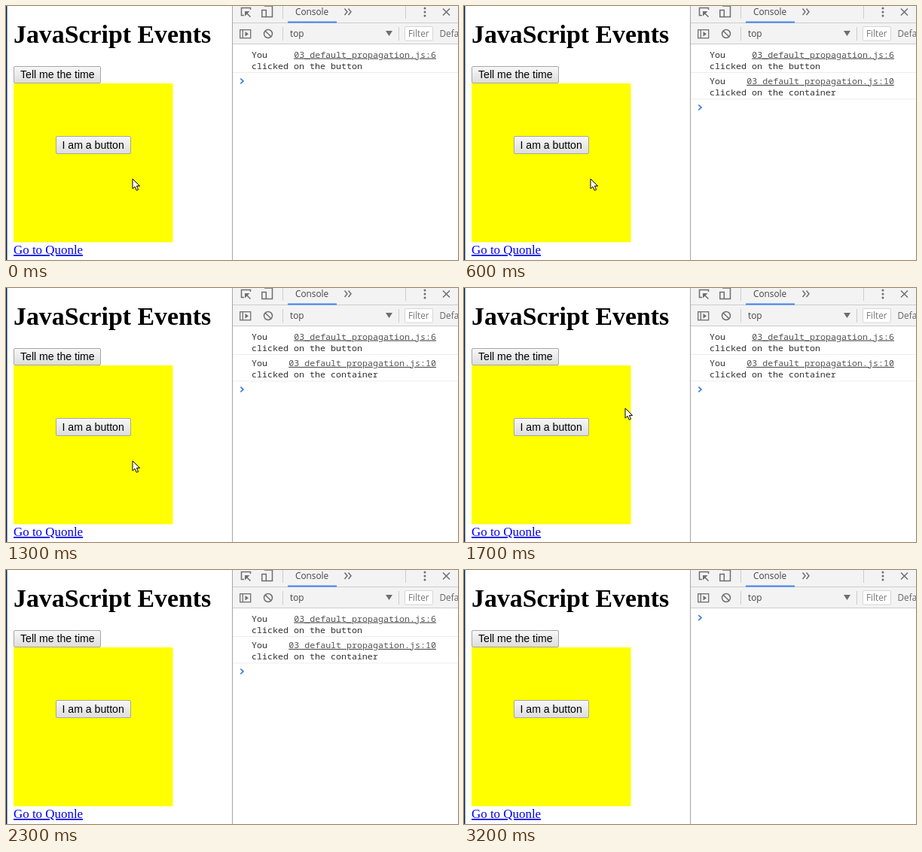
Recreate the animation shown at these times as an HTML page. Size 600 by 338 pixels, loop 3300 ms.

```html
<!DOCTYPE html>
<html lang="en">
<head>
<meta charset="utf-8">
<title>JavaScript Events</title>
<style>
  html, body { margin: 0; width: 100%; height: 100%; overflow: hidden; background: #fff; }
  svg { display: block; width: 600px; height: 338px; }
  text { white-space: pre; }
  .serif { font-family: "Liberation Serif", "Times New Roman", serif; }
  .button { font: 14.1px "Liberation Sans", Arial, sans-serif; }
  .ui { font: 11.8px "Open Sans", "Noto Sans", sans-serif; fill: #454545; }
  .log text { font: 11.67px "Noto Sans Mono", "DejaVu Sans Mono", monospace; fill: #303030; }
  .log .src { fill: #545454; text-anchor: end; text-decoration: underline; }
  .icon { fill: none; stroke: #6e6e6e; stroke-width: 1.5; }
  .solid { fill: #6e6e6e; }
  .rule { fill: none; stroke: #ccc; }
</style>
</head>
<body>
<svg viewBox="0 0 600 338">
  <defs>
    <linearGradient id="face" x2="0" y2="1">
      <stop stop-color="#f8f8f8"/><stop offset="1" stop-color="#dddddd"/>
    </linearGradient>
  </defs>
  <rect width="600" height="338" fill="#fff"/>
  <rect width="1.5" height="338" fill="#0b2c50"/>

  <!-- page -->
  <text class="serif" x="10" y="49" font-size="33.85" font-weight="bold">JavaScript Events</text>
  <rect x="10" y="103" width="211.5" height="211.3" fill="#ff0"/>
  <g fill="url(#face)" stroke="#a6a6a6">
    <rect x="10.5" y="80.5" width="115" height="22" rx="1.5"/>
    <rect x="66.5" y="173.5" width="99" height="23" rx="1.5"/>
  </g>
  <text class="button" x="19" y="96">Tell me the time</text>
  <text class="button" x="74.5" y="189.5">I am a button</text>
  <text class="serif" x="10" y="330" font-size="16.93" fill="#0000ee" text-decoration="underline">Go to Quonle</text>

  <!-- developer tools -->
  <rect x="301" width="299" height="50" fill="#f3f3f3"/>
  <path class="rule" d="M301 22.5H600M301 50.5H600M367.5 0V17M530.5 0V17M367.5 28V46M521.5 28V46"/>
  <path d="M300.5 0V338" stroke="#a5a5a5"/>
  <rect x="374" y="20.5" width="65" height="2" fill="#4285f4"/>
  <g class="icon">
    <path d="M316 12.5H312.5V2.5H324.5V5"/>
    <path d="M324.5 14.5L319 9"/>
    <path d="M343 0H353.5V14.5H346"/>
    <rect x="339.8" y="5.5" width="5.5" height="9"/>
    <path d="M449.5 3.5L453 7.8L449.5 12M454.5 3.5L458 7.8L454.5 12"/>
    <path d="M580 3.5L589 12.5M589 3.5L580 12.5"/>
    <rect x="310.7" y="31.7" width="14" height="11" stroke-width="1.3"/>
    <path d="M314.3 32V42.5" stroke-width="1.3"/>
    <circle cx="348" cy="37" r="5.5"/>
    <path d="M344.2 33.2L351.8 40.8"/>
  </g>
  <g class="solid">
    <path d="M317 7H323.5L317 13.5ZM317.5 34L322 37.2L317.5 40.4ZM504 33H513L508.5 40Z"/>
    <circle cx="556" cy="3" r="1.5"/><circle cx="556" cy="8" r="1.5"/><circle cx="556" cy="13" r="1.5"/>
  </g>
  <rect x="529.5" y="27.5" width="37" height="18.5" rx="1.5" fill="#fff" stroke="#d6d6d6"/>
  <text class="ui" x="384" y="12">Console</text>
  <text class="ui" x="377" y="41">top</text>
  <text class="ui" x="534" y="41" style="fill:#777">Filter</text>
  <text class="ui" x="575.5" y="41" style="fill:#666">Default levels</text>

  <g id="logs"></g>
  <path id="prompt" d="M311.3 -3.3L315 0L311.3 3.3" fill="none" stroke="#3f7fe0" stroke-width="1.7"/>

  <g id="tip" opacity=".25">
    <rect x="85.5" y="-10" width="345" height="20.5" fill="#fff" stroke="#888"/>
    <text class="ui" x="91" y="5">Vuelve a cargar esta página y espera para ver más opciones</text>
  </g>
  <path id="cursor" d="M0 0V13.2L3.1 10.4L5.3 15.4L7.6 14.4L5.4 9.6H9.6Z" fill="#fff" stroke="#000" stroke-width="1" stroke-linejoin="round"/>
</svg>
<script>
const LOOP = 3300, STEP = 100;
const el = id => document.getElementById(id);

const entries = [["button", 6], ["container", 10]];
el("logs").innerHTML = entries.map(([target, line], i) => `
  <g class="log" transform="translate(0 ${i * 35.4})">
    <text x="326" y="68.5">You</text>
    <text class="src" x="571" y="68.5">03_default_propagation.js:${line}</text>
    <text x="326" y="83.5">clicked on the ${target}</text>
    <path d="M301 88.5H600" stroke="#ececec"/>
  </g>`).join("");
const rows = [...el("logs").children];
const promptY = [63.5, 100, 135];

// [time, x, y] of the pointer tip
const path = [
  [1400, 168, 230], [1500, 178, 216], [1600, 197, 187], [1700, 214, 160], [1800, 229, 122],
  [1900, 235, 84], [2000, 222, 46], [2100, 194, 12], [2200, 150, -30]
];

function pointerAt(t) {
  const [, x, y] = path.filter(p => p[0] <= t).pop() || path[0];
  return `translate(${x} ${y})`;
}

function draw(now) {
  const t = Math.floor((now % LOOP) / STEP) * STEP;
  const count = t < 100 ? 1 : t < 3000 ? 2 : 0;
  rows.forEach((row, i) => row.setAttribute("visibility", i < count ? "visible" : "hidden"));
  el("prompt").setAttribute("transform", `translate(0 ${promptY[count]})`);
  el("tip").setAttribute("visibility", t === 2900 ? "visible" : "hidden");
  el("cursor").setAttribute("transform", pointerAt(t));
}

const start = performance.now();
function tick() {
  draw(performance.now() - start);
  requestAnimationFrame(tick);
}
tick();
</script>
</body>
</html>
```
